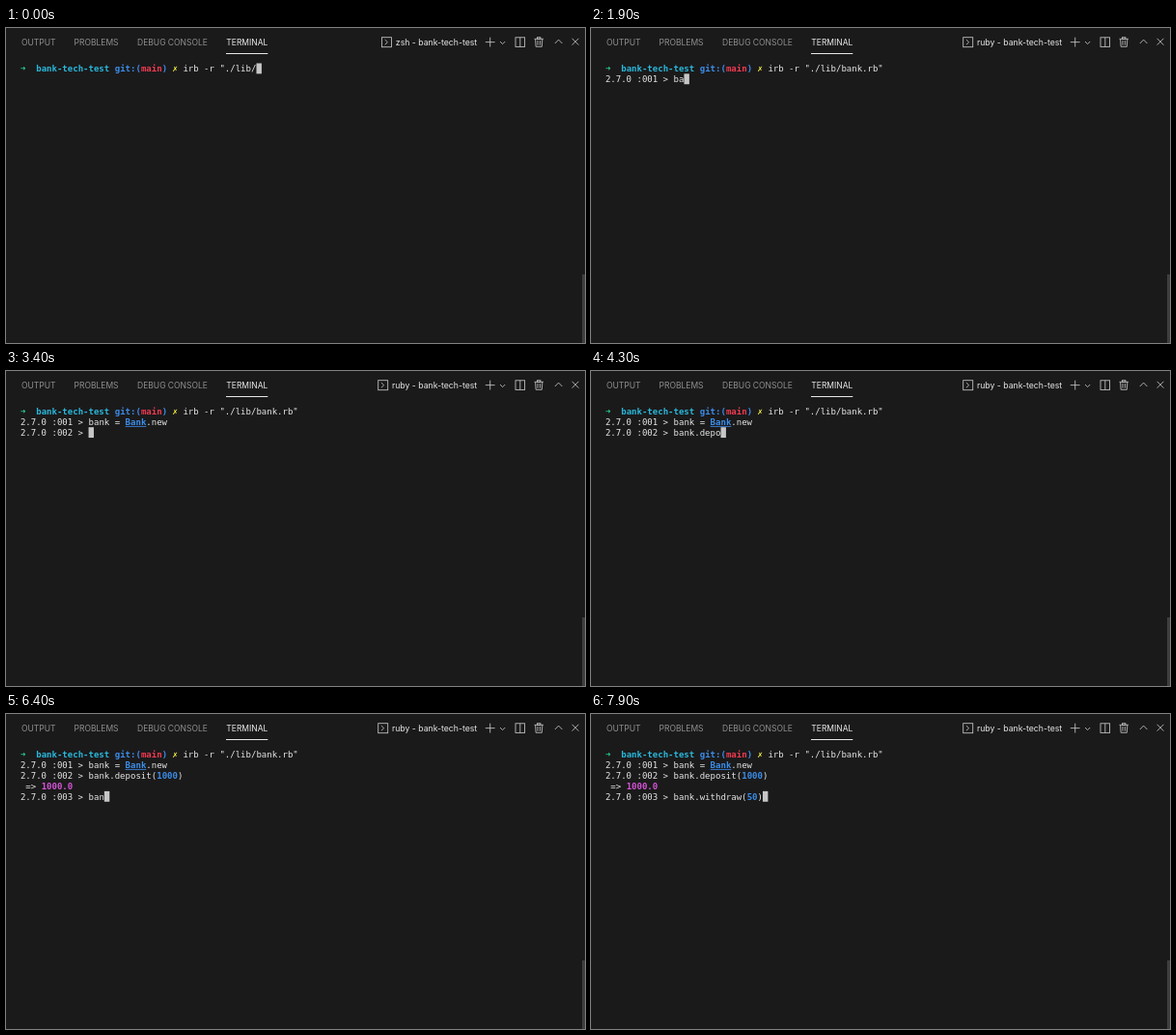
Recreate the animation shown at these times as an HTML page with a canvas. Size 600 px wide and 326 px high, loop 8000 ms.

```html
<!DOCTYPE html>
<html lang="en">
<head>
<meta charset="utf-8">
<title>Terminal session</title>
<style>
html, body { margin: 0; width: 100%; height: 100%; overflow: hidden; background: #1b1a1b; }
canvas { display: block; width: 600px; height: 326px; }
</style>
</head>
<body>
<canvas id="stage"></canvas>
<script>
const W = 600, H = 326, LOOP = 8000, TICK = 100;
const LEFT = 14.9, TOP = 36.5, CELL = 5.435, ROW = 10.85;
const MONO = '9.03px "DejaVu Sans Mono", monospace';
const UI = 'Inter, sans-serif';
const C = {
  bg: '#1b1a1b', text: '#e6e6e6', cursor: '#c6c6c6', dim: '#8f8e8f', bright: '#e7e7e7', icon: '#c5c5c5',
  green: '#23d18b', cyan: '#29b8db', blue: '#3b8eea', red: '#f03a50', yellow: '#f5f543', magenta: '#d655d8'
};

const canvas = document.getElementById('stage');
const ctx = canvas.getContext('2d');
const dpr = window.devicePixelRatio || 1;
canvas.width = W * dpr;
canvas.height = H * dpr;
ctx.scale(dpr, dpr);

// Every burst of typing: start in ms, text, number of ticks it takes.
const entries = [
  { row: 0, col: 31, from: 0, to: 1000,
    bursts: [[0, 'irb -r "./lib/', 1], [300, 'b', 1], [500, 'ank.rb" ', 1]] },
  { row: 1, col: 13, from: 1200, to: 3300, prompt: '2.7.0 :001 > ',
    bursts: [[1900, 'bank = ', 5], [2500, 'Bank.new', 8]] },
  { row: 2, col: 13, from: 3300, to: 5600, prompt: '2.7.0 :002 > ',
    bursts: [[3500, 'bank.de', 6], [4300, 'posit', 4], [5100, '(', 1], [5300, '1000)', 3]] },
  { row: 4, col: 13, from: 5600, to: LOOP, prompt: '2.7.0 :003 > ',
    bursts: [[6400, 'ban', 1], [6500, 'k.w', 3], [6900, 'ithdraw', 5], [7700, '(50)', 3]] }
];

function typed(bursts, t) {
  return bursts.map(([at, text, ticks]) => {
    const step = Math.min(ticks, Math.floor((t - at) / TICK) + 1);
    return text.slice(0, Math.max(0, Math.ceil(text.length * step / ticks)));
  }).join('');
}

function label(str, x, y, font, color, align = 'left') {
  ctx.font = font;
  ctx.fillStyle = color;
  ctx.textAlign = align;
  ctx.fillText(str, x, y);
}

// Coloured terminal text is always bold.
function put(row, col, str, color) {
  label(str, LEFT + col * CELL, TOP + row * ROW + 8.6, (color ? 'bold ' : '') + MONO, color || C.text);
  return col + str.length;
}

function putCode(row, col, code) {
  for (const part of code.split(/(B(?:ank?|a)?|\d+)/)) {
    const isClass = part[0] === 'B';
    const next = put(row, col, part, isClass || /^\d/.test(part) ? C.blue : '');
    if (isClass) ctx.fillRect(LEFT + col * CELL, TOP + row * ROW + 9.6, part.length * CELL, 0.8);
    col = next;
  }
  return col;
}

function cursor(row, col) {
  ctx.fillStyle = C.cursor;
  ctx.fillRect(LEFT + col * CELL, TOP + row * ROW, CELL, ROW);
}

function line(...pts) {
  ctx.beginPath();
  pts.forEach(([x, y]) => ctx.lineTo(x, y));
  ctx.stroke();
}

// A chevron with its tip at x, y.
function chevron(x, y, dx, dy) {
  line([x - dx, y + dy], [x, y], [x + dx, y + dy]);
}

function drawTrash(x, y) {
  line([x - 4.7, y], [x + 4.7, y]);
  ctx.strokeRect(x - 1.7, y - 1.6, 3.4, 1.6);
  line([x - 3.6, y], [x - 3.1, y + 8], [x + 3.1, y + 8], [x + 3.6, y]);
  for (const side of [-1.2, 1.2]) line([x + side, y + 1.6], [x + side, y + 6.4]);
}

function drawHeader(t) {
  const tabs = { OUTPUT: 16, PROBLEMS: 70.5, 'DEBUG CONSOLE': 136, TERMINAL: 228.3 };
  for (const name in tabs) {
    label(name, tabs[name], 18.1, '8.5px ' + UI, name === 'TERMINAL' ? C.bright : C.dim);
  }
  ctx.fillStyle = C.bright;
  ctx.fillRect(tabs.TERMINAL - 0.3, 26, 43.3, 1);

  const shell = t < 1100 ? 'zsh' : 'ruby';
  label(shell + ' - bank-tech-test', 488.2, 18, '8.7px ' + UI, C.bright, 'right');

  ctx.strokeStyle = C.icon;
  ctx.lineWidth = 0.85;
  const x = shell === 'zsh' ? 389.5 : 385.7;
  ctx.strokeRect(x, 9.7, 10, 10);
  line([x + 3.2, 12.1], [x + 5.9, 14.7], [x + 3.2, 17.3]);

  line([496.8, 14.6], [506.6, 14.6]);
  line([501.7, 9.7], [501.7, 19.5]);
  chevron(514.6, 16.6, 2.6, -2.6);
  ctx.strokeRect(528, 9.8, 9.6, 9.6);
  line([532.8, 9.8], [532.8, 19.4]);
  drawTrash(552.2, 11.3);
  chevron(572.6, 12.1, 3.8, 3.9);
  line([586.6, 10.8], [593.4, 17.6]);
  line([593.4, 10.8], [586.6, 17.6]);
}

function drawTerminal(t) {
  put(0, 0, '➜', C.green);
  put(0, 3, 'bank-tech-test', C.cyan);
  put(0, 18, 'git:(', C.blue);
  put(0, 23, 'main', C.red);
  put(0, 27, ')', C.blue);
  put(0, 29, '✗', C.yellow);

  for (const { row, col, from, to, prompt, bursts } of entries) {
    if (t < from) break;
    if (prompt) put(row, 0, prompt);
    const code = typed(bursts, t);
    const end = prompt ? putCode(row, col, code) : put(row, col, code);
    if (t < to) cursor(row, end);
  }

  if (t >= 100 && t < 1000) {
    put(1, 0, 'bank.rb');
    put(1, 22, 'statement_printer.rb');
  }
  if (t >= 1000 && t < 1200) cursor(1, 0);
  if (t >= 5600) put(3, put(3, 0, ' => '), '1000.0', C.magenta);
}

function draw(t) {
  ctx.fillStyle = C.bg;
  ctx.fillRect(0, 0, W, H);
  ctx.fillStyle = '#3f3d3e';
  ctx.fillRect(597, 255, 3, H - 255);
  drawHeader(t);
  drawTerminal(t);
}

const start = performance.now();
function tick() {
  draw((performance.now() - start) % LOOP);
  requestAnimationFrame(tick);
}
tick();
</script>
</body>
</html>
```
